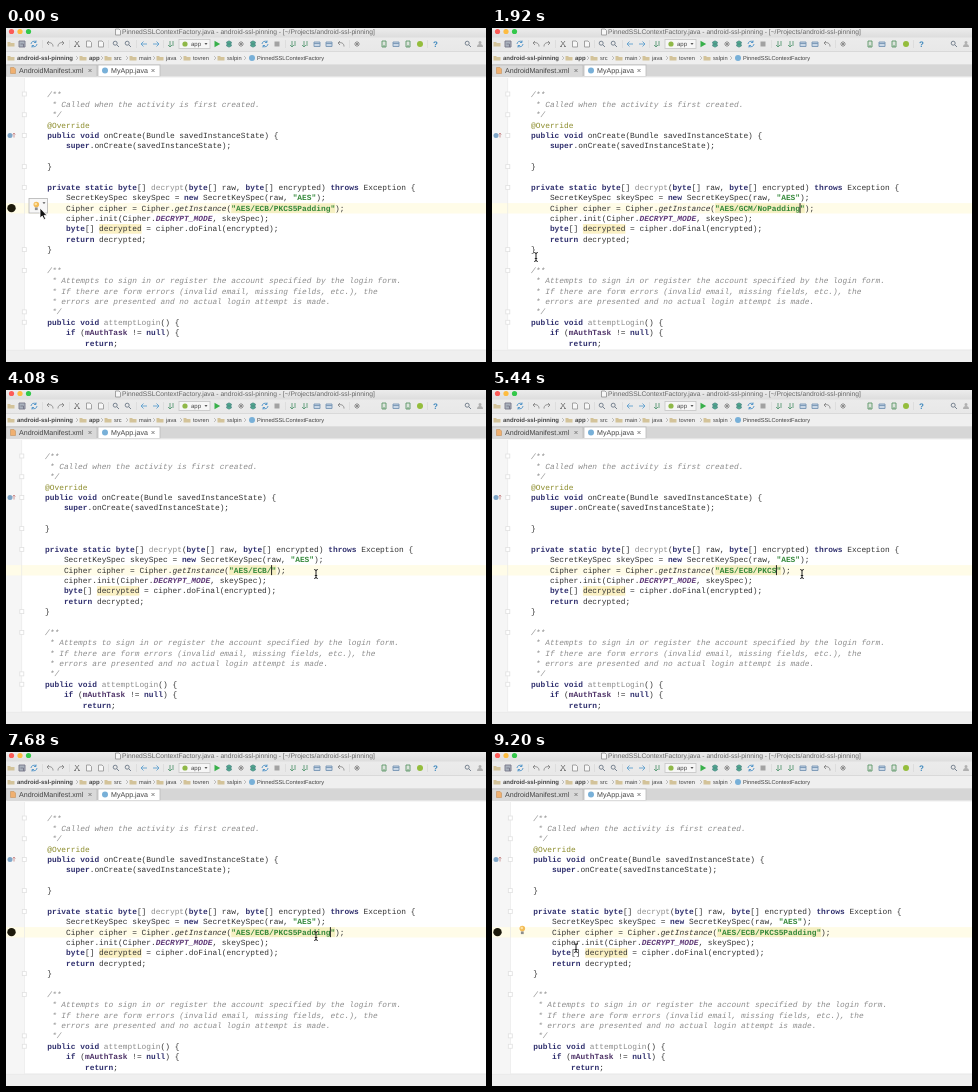
Animation, 480 px wide and 334 px high, one loop 9280 ms. Source, as an HTML page with a canvas:

```html
<!DOCTYPE html>
<html lang="en">
<head>
<meta charset="utf-8">
<title>Editor quick fix</title>
<style>
  html, body { margin: 0; width: 100%; height: 100%; overflow: hidden; background: #fff; }
  canvas { display: block; width: 480px; height: 334px; }
</style>
</head>
<body>
<canvas id="stage"></canvas>
<script>
const LOOP = 9280, STEP = 80;
const ADVANCE = 4.72, FIRST_ROW = 66, ROW = 10.375, CIPHER_ROW = 11;
const MONO = '7.867px "Liberation Mono", "Courier New", monospace';
const SANS = '"Liberation Sans", Arial, sans-serif';

const canvas = document.getElementById('stage');
const dpr = window.devicePixelRatio || 1;
canvas.width = 480 * dpr;
canvas.height = 334 * dpr;
const ctx = canvas.getContext('2d');
ctx.scale(dpr, dpr);
ctx.textRendering = 'geometricPrecision';

// ---------- drawing helpers ----------
function rect(x, y, w, h, fill, stroke) {
  if (fill) { ctx.fillStyle = fill; ctx.fillRect(x, y, w, h); }
  if (stroke) { ctx.strokeStyle = stroke; ctx.lineWidth = 0.8; ctx.strokeRect(x, y, w, h); }
}
function disc(x, y, r, fill) {
  ctx.fillStyle = fill;
  ctx.beginPath();
  ctx.arc(x, y, r, 0, 7);
  ctx.fill();
}
function shape(x, y, d, fill, stroke, width = 1) {
  const path = new Path2D(d);
  ctx.save();
  ctx.translate(x, y);
  if (fill) { ctx.fillStyle = fill; ctx.fill(path); }
  if (stroke) { ctx.strokeStyle = stroke; ctx.lineWidth = width; ctx.stroke(path); }
  ctx.restore();
}
function label(text, x, y, size, color = '#444', style = '') {
  ctx.font = `${style} ${size}px ${SANS}`;
  ctx.fillStyle = color;
  ctx.fillText(text, x, y + size * 0.35);
}
function gradient(y, h, top, bottom) {
  const g = ctx.createLinearGradient(0, y, 0, y + h);
  g.addColorStop(0, top);
  g.addColorStop(1, bottom);
  rect(0, y, 480, h, g);
}

// ---------- window frame ----------
const ICONS = {
  folder: ['M-3.5-2H-1L0-1H3.5V2.5H-3.5Z', '#d3c39a'],
  page: ['M-2.5-3H1L2.5-1.5V3H-2.5Z', '#f7f7f7', '#999'],
  save: ['M-3-3H3V3H-3ZM-1.5 0H1.5V3', '#aab2bd', '#778'],
  sync: ['M-3 0A3 3 0 0 1 2-2M3 0A3 3 0 0 1-2 2M2-3.5V-1.5H0M-2 3.5V1.5H0', null, '#4d92c8'],
  undo: ['M3 2.5C3-1 0-2-3-1M-1-3L-3-1L-1 1', null, '#888'],
  redo: ['M-3 2.5C-3-1 0-2 3-1M1-3L3-1L1 1', null, '#888'],
  cut: ['M-2-3L2 2M2-3L-2 2M-3 2.5H-1M1 2.5H3', null, '#777'],
  find: ['M-2.8-.8A2 2 0 1 0 1.2-.8A2 2 0 1 0-2.8-.8M.7.7L3 3', null, '#6b7886'],
  back: ['M3 0H-3M-.5-2.5L-3 0L-.5 2.5', null, '#5fa0cf'],
  forward: ['M-3 0H3M.5-2.5L3 0L.5 2.5', null, '#5fa0cf'],
  down: ['M-1-3V3M-3 1L-1 3L1 1M2-3V2', null, '#5c9b78'],
  play: ['M-2.5-3.2L3.2 0L-2.5 3.2Z', '#38b04a'],
  bug: ['M-2-1A2 2 0 0 1 2-1V1A2 2 0 0 1-2 1ZM-3-2L3 2M3-2L-3 2', '#4bab8b', '#50908a'],
  gear: ['M0-3V3M-3 0H3M-2-2L2 2M2-2L-2 2', null, '#8a8a8a'],
  stop: ['M-2.5-2.5H2.5V2.5H-2.5Z', '#a2a2a2'],
  phone: ['M-2-3H2V3H-2ZM-1 2H1', '#dce4dc', '#5d9668'],
  box: ['M-3-2H3V2.5H-3ZM-3-.5H3', '#c9d7e6', '#7896b5'],
  user: ['M-3 3A3 3 0 0 1 3 3ZM0-3A1.5 1.5 0 0 1 0 0A1.5 1.5 0 0 1 0-3', '#b0b0b0'],
};
function icon(name, x, y) {
  const [d, fill, stroke] = ICONS[name];
  shape(x, y, d, fill, stroke, 0.9);
}
const TOOLBAR = [
  ['folder', 5], ['save', 16], ['sync', 28], ['undo', 44], ['redo', 55], ['cut', 71], ['page', 83],
  ['page', 95], ['find', 110], ['find', 122], ['back', 138], ['forward', 150], ['down', 165],
  ['play', 211], ['bug', 223], ['gear', 235], ['bug', 247], ['sync', 259], ['stop', 271],
  ['down', 287], ['down', 299], ['box', 311], ['box', 323], ['undo', 335], ['gear', 351],
  ['phone', 378], ['box', 390], ['phone', 402], ['find', 462], ['user', 474],
];
const CRUMBS = [
  ['android-ssl-pinning', 11, 'bold'], ['app', 83, 'bold'], ['src', 108], ['main', 133],
  ['java', 160], ['tovren', 187], ['sslpin', 221], ['PinnedSSLContextFactory', 251],
];

function drawTab(name, x, textX, width, active) {
  rect(x, 37, width, 11.5, active ? '#fff' : '#d9d9d9', '#bbb');
  if (active) disc(textX - 6, 42.5, 3, '#78b0d8');
  else shape(textX - 6, 42.5, 'M-2.5-3H1L2.5-1.5V3H-2.5Z', '#f0b070', '#c99a68', 0.7);
  label(name, textX, 42.5, 7.1);
  shape(x + width - 7, 42.5, 'M-1.5-1.5L1.5 1.5M1.5-1.5L-1.5 1.5', null, '#777', 0.9);
}

function drawFrame() {
  gradient(0, 10, '#ececec', '#dcdcdc');
  ['#fc5b57', '#fdbc40', '#34c84a'].forEach((c, i) => disc(5.5 + 8.5 * i, 3.5, 2.6, c));
  icon('page', 112, 4);
  label('PinnedSSLContextFactory.java - android-ssl-pinning - [~/Projects/android-ssl-pinning]',
    116, 3.8, 6.7, '#666');

  gradient(9.5, 14, '#ebebeb', '#e8e8e8');
  TOOLBAR.forEach(([name, x]) => icon(name, x, 16));
  [36, 63, 102, 130, 157, 279, 343, 421].forEach(x => rect(x, 12, 0.5, 8, '#d0d0d0'));
  rect(173, 11.5, 31, 9, '#f6f6f6', '#c5c5c5');
  disc(179, 16, 2.6, '#8fb848');
  label('app', 185, 16, 6);
  shape(200, 16, 'M-1.5-1H1.5L0 1Z', '#555');
  disc(414, 16, 3, '#94bd3c');
  label('?', 427, 16, 8, '#3c87bd', 'bold');

  rect(0, 23.5, 480, 13, '#efefef');
  rect(0, 23.3, 480, 0.6, '#d0d0d0');
  CRUMBS.forEach(([name, x, weight = ''], i) => {
    if (i === CRUMBS.length - 1) disc(x - 5, 30, 3, '#78b0d8');
    else icon('folder', x - 6, 30);
    label(name, x, 30, weight ? 6 : 5.7, '#444', weight);
    if (i) shape(x - 12, 30, 'M-1-2L1 0L-1 2', null, '#aaa', 0.7);
  });

  rect(0, 36.5, 480, 13, '#d6d6d6');
  drawTab('AndroidManifest.xml', 0, 13, 91, false);
  drawTab('MyApp.java', 92, 105, 62, true);
  rect(0, 48.5, 480, 1.5, '#f6f6f6');
  rect(0, 322, 480, 12, '#efefef');
  rect(0, 321.5, 480, 0.7, '#dadada');
}

// ---------- editor ----------
const codeLines = cipherName => [
  '/**',
  ' * Called when the activity is first created.',
  ' */',
  '@Override',
  'public void onCreate(Bundle savedInstanceState) {',
  '    super.onCreate(savedInstanceState);',
  '',
  '}',
  '',
  'private static byte[] decrypt(byte[] raw, byte[] encrypted) throws Exception {',
  '    SecretKeySpec skeySpec = new SecretKeySpec(raw, "AES");',
  `    Cipher cipher = Cipher.getInstance("${cipherName}");`,
  '    cipher.init(Cipher.DECRYPT_MODE, skeySpec);',
  '    byte[] decrypted = cipher.doFinal(encrypted);',
  '    return decrypted;',
  '}',
  '',
  '/**',
  ' * Attempts to sign in or register the account specified by the login form.',
  ' * If there are form errors (invalid email, missing fields, etc.), the',
  ' * errors are presented and no actual login attempt is made.',
  ' */',
  'public void attemptLogin() {',
  '    if (mAuthTask != null) {',
  '        return;',
];
const SYNTAX = [
  [/^(\/\*\*| \*.*)/, '#8c8c8c', 'italic'],
  [/^@\w+/, '#8c8c2c', ''],
  [/^"[^"]*"/, '#34883a', 'bold'],
  [/^(public|private|static|void|byte|throws|new|return|super|if|null)\b/, '#30306e', 'bold'],
  [/^getInstance/, '#333', 'italic'],
  [/^DECRYPT_MODE/, '#5f3a78', 'italic bold'],
  [/^mAuthTask/, '#4f3468', 'bold'],
  [/^(attemptLogin|decrypt)\b/, '#8c8c8c', ''],
  [/^(\w+|.)/, '#333', ''],
];
const rowY = row => FIRST_ROW + ROW * row;

function drawCodeLine(line, x0, y) {
  for (let col = 0; col < line.length;) {
    const rest = line.slice(col);
    const [pattern, color, style] = SYNTAX.find(([p]) => p.test(rest));
    const token = rest.match(pattern)[0];
    ctx.font = `${style} ${MONO}`;
    ctx.fillStyle = color;
    for (const ch of token) ctx.fillText(ch, x0 + ADVANCE * col++, y + 2.6);
  }
}

function drawEditor(s) {
  const x0 = s.flagged ? 41.2 : 39;
  const gutter = s.flagged ? 18 : 15.5;
  const y = rowY(CIPHER_ROW);
  const colX = col => x0 + ADVANCE * col;

  rect(0, 50, 480, 271.5, '#fff');
  rect(0, 50, gutter, 271.5, '#f6f6f6');
  rect(0, y - 5, 480, ROW, '#fffce8');
  rect(gutter, 50, 0.6, 271.5, '#e4e4e4');
  [0, 2, 4, 7, 9, 15, 17, 21, 22].forEach(row =>
    rect(gutter - 1.7, rowY(row) - 2, 4, 4, '#fff', '#e0e0e0'));

  disc(4, rowY(4), 2.5, '#7fa6c8');
  shape(8, rowY(4), 'M0 2V-2.5M-1.3-1L0-2.5L1.3-1', null, '#c58080', 0.8);

  rect(colX(11), rowY(13) - 4.8, ADVANCE * 9, 9.6, '#fbf1c4');
  rect(colX(39), y - 4.8, ADVANCE * (s.cipher.length + 2), 9.6, '#f5efc2');
  if (s.flagged) disc(5.5, y, 4.2, '#1d1a0c');
  codeLines(s.cipher).forEach((line, i) => drawCodeLine(line, x0, rowY(i)));
  if (s.caret) rect(colX(40 + s.cipher.length) - 0.5, y - 5, 1, 10, '#222');
}

// ---------- quick-fix popup ----------
function drawBulb(boxed) {
  if (boxed) {
    rect(23, 170.5, 18.5, 14.5, '#f7f7f7', '#b4b4b4');
    shape(38, 175, 'M-1.5-.8H1.5L0 1Z', '#555');
  }
  disc(30.3, 176.6, 2.8, '#f3bb56');
  disc(29.8, 176, 1.3, '#fde3a4');
  rect(28.9, 179.5, 2.8, 2.6, '#8d8d8d');
}

const MENU = [
  ['', 194, 'cross'], ['Disable inspection', 205.5, 'cross'],
  ["Edit 'getInstance Called' inspection settings", 217, 'wrench'],
  ['Replace with AES/GCM/NoPadding', 229, 'dot'],
  ['Extract string resource', 244.5, 'pen'], ['Inject language or reference', 256, 'pen'],
  ['Split into declaration and assignment', 268, 'pen'],
];
function drawMenu(selected) {
  ctx.save();
  ctx.shadowColor = 'rgba(0,0,0,.3)';
  ctx.shadowBlur = 5 * dpr;
  ctx.shadowOffsetY = 2 * dpr;
  rect(22.5, 185, 154.5, 90, '#fff');
  ctx.restore();
  rect(22.5, 185, 154.5, 90, null, '#b5b5b5');
  rect(23, 236.7, 153.5, 0.6, '#d3d3d3');
  MENU.forEach(([text, y, kind], i) => {
    const active = i === selected;
    if (active) rect(23, y - 5.8, 153.5, 11.6, '#3b78d4');
    if (kind === 'cross') shape(31, y, 'M-2.6-2.6L2.6 2.6M2.6-2.6L-2.6 2.6', null, '#d8564b', 1.3);
    if (kind === 'wrench') shape(31, y, 'M-2.5-2.5L2.5 2.5M-3-.5L-.5-3', null, '#b09a72', 1.5);
    if (kind === 'dot') disc(31, y, 4, '#1d1a0c');
    if (kind === 'pen') {
      shape(31, y, 'M-2.5 2.5L2-2', null, '#5f9658', 1.5);
      shape(170, y, 'M-1.2-2L1.5 0L-1.2 2Z', active ? '#fff' : '#666');
    }
    label(text, 38, y, 6.9, active ? '#fff' : '#333');
  });
}

// ---------- pointer ----------
const POINTERS = {
  arrow: () => shape(0, 0, 'M0-3V7L2.3 5L4 8.5L5.6 7.7L4 4.4H7Z', '#111', '#fff', 0.8),
  hand: () => shape(0, 0, 'M-1.5-5Q-.3-6 .4-4.5V-1L3.5-.3Q5 .2 4.5 2L3.5 5.5H-1L-4 1.5Q-3.5 0-1.5 1Z',
    '#fff', '#222', 0.8),
  beam: () => shape(0, 0, 'M-1.8-4.5Q0-4.5 0-3V3Q0 4.5-1.8 4.5M1.8-4.5Q0-4.5 0-3M0 3Q0 4.5 1.8 4.5M-1.2 1.5H1.2',
    null, '#222', 1),
};
const POINTER_PATH = [
  [0, 34, 183], [240, 34, 183], [880, 46, 217], [1040, 44, 229], [2880, 44, 229], [3200, 310, 184],
  [7760, 310, 184], [8560, 150, 215], [8800, 150, 215], [9200, 84, 196], [LOOP, 34, 183],
];
function pointerAt(t) {
  const i = POINTER_PATH.findIndex(([time]) => time > t);
  const [t0, x0, y0] = POINTER_PATH[i - 1], [t1, x1, y1] = POINTER_PATH[i];
  const p = (t - t0) / (t1 - t0), k = p * p * (3 - 2 * p);
  return [x0 + (x1 - x0) * k, y0 + (y1 - y0) * k];
}
function drawPointer(t) {
  const kind = t < 320 ? 'arrow' : t < 1200 ? 'hand' : 'beam';
  ctx.save();
  ctx.translate(...pointerAt(t));
  POINTERS[kind]();
  ctx.restore();
}

// ---------- timeline ----------
const FULL = 'AES/ECB/PKCS5Padding';
const REPLACED = 1280, UNFLAGGED = 1440, DELETIONS = [3200, 3360], REFLAGGED = 7520;
const KEYS = [3760, 3920, 4080, 4080, 4400, 4560, 5120, 5440, 5680,
  6400, 6560, 6720, 6880, 7040, 7200, 7360];
const EDITS = [UNFLAGGED, ...DELETIONS, ...KEYS];

function cipherAt(t) {
  if (t < REPLACED) return FULL;
  if (t < DELETIONS[0]) return 'AES/GCM/NoPadding';
  if (t < DELETIONS[1]) return 'AES/GCM/';
  return FULL.slice(0, 4 + KEYS.filter(k => k <= t).length);
}
function caretAt(t) {
  const now = t < UNFLAGGED ? t + LOOP : t;
  const lastEdit = Math.max(...EDITS.filter(e => e <= now));
  return (now - lastEdit) % 1000 < 500;
}

function render(t) {
  drawFrame();
  drawEditor({ cipher: cipherAt(t), caret: caretAt(t), flagged: t < UNFLAGGED || t >= REFLAGGED });
  if (t < 1200 || t >= 8480) drawBulb(t < 1200);
  if (t >= 320 && t < 1200) {
    const y = pointerAt(t)[1];
    drawMenu(MENU.findIndex(([, itemY]) => Math.abs(itemY - y) <= 6));
  }
  drawPointer(t);
}

function tick() {
  render(Math.floor(performance.now() % LOOP / STEP) * STEP);
  requestAnimationFrame(tick);
}
tick();
</script>
</body>
</html>
```
